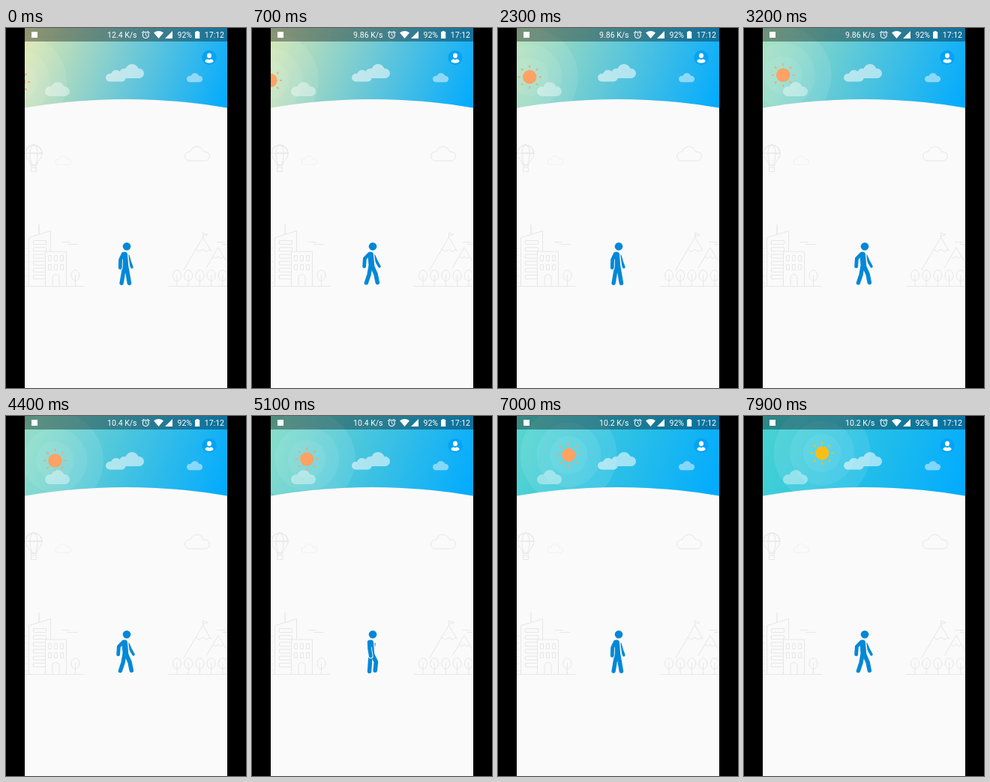
An HTML page with a canvas that plays this animation: 320x480 px, repeating every 8 s.

```html
<!DOCTYPE html>
<html>
<head>
<meta charset="utf-8">
<style>
html, body { margin: 0; width: 100%; height: 100%; overflow: hidden; background: #000; }
canvas { display: block; width: 320px; height: 480px; }
</style>
</head>
<body>
<canvas id="stage"></canvas>
<script>
const LOOP = 8000, STEP = 100, TAU = Math.PI * 2;
const LEFT = 25, WIDTH = 270, GROUND = 344.5;
const PAPER = '#fafafa', BLUE = '#0288d6', LINE = '#e7e7e7';
const canvas = document.getElementById('stage');
const ratio = window.devicePixelRatio || 1;
canvas.width = 320 * ratio;
canvas.height = 480 * ratio;
const c = canvas.getContext('2d');
c.scale(ratio, ratio);

const white = a => `rgba(255,255,255,${a})`;
const mix = (a, b, k) => a + (b - a) * k;

function oval(x, y, rx, ry) {
  c.beginPath();
  c.ellipse(x, y, rx, ry, 0, 0, TAU);
}

function disc(x, y, r, fill) {
  oval(x, y, r, r);
  c.fillStyle = fill;
  c.fill();
}

function line(color, width, ...points) {
  c.beginPath();
  for (let i = 0; i < points.length; i += 2) c.lineTo(points[i], points[i + 1]);
  c.strokeStyle = color;
  c.lineWidth = width;
  c.stroke();
}

// adds a cloud 33 x 19 units in size to the path
function puff(x, y, s) {
  for (const [cx, r] of [[6.5, 6.5], [17, 9], [26.5, 6.5]]) {
    const cy = r > 8 ? 9 : 12.5;
    c.moveTo(x + (cx + r) * s, y + cy * s);
    c.arc(x + cx * s, y + cy * s, r * s, 0, TAU);
  }
  c.rect(x + 6.5 * s, y + 10 * s, 20 * s, 9 * s);
}

function clouds(alpha, ...list) {
  c.beginPath();
  list.forEach(p => puff(...p));
  c.fillStyle = white(alpha);
  c.fill();
}

function cloudLine(x, y, s, color) {
  c.strokeStyle = color;
  c.beginPath();
  c.arc(x + 6 * s, y + 13 * s, 6 * s, Math.PI / 2, Math.PI * 1.55);
  c.arc(x + 16 * s, y + 9 * s, 9 * s, Math.PI * 1.08, Math.PI * 1.88);
  c.arc(x + 27 * s, y + 13 * s, 6 * s, Math.PI * 1.4, Math.PI * 2.5);
  c.closePath();
  c.stroke();
}

function sky(k) {
  // the near corner cools from straw to teal as the sun climbs
  const g = c.createLinearGradient(LEFT, 0, LEFT + WIDTH, 107);
  g.addColorStop(0, `rgb(${mix(226, 72, k)},${mix(232, 212, k)},${mix(172, 208, k)})`);
  g.addColorStop(1, '#00aaff');
  c.fillStyle = g;
  c.fillRect(LEFT, 0, WIDTH, 112);
}

function sun(k) {
  const x = mix(16.7, 105.3, k), y = mix(71.8, 49.2, k);
  const color = k < 0.91 ? '#ffa264' : '#f7bf16';
  disc(x, y, 64.5, white(0.09));
  disc(x, y, 43, white(0.07));
  disc(x, y, 25.5, white(0.06));
  disc(x, y, 9.2, color);
  c.lineCap = 'round';
  for (let a = 0; a < TAU; a += TAU / 8) {
    const dx = Math.cos(a), dy = Math.sin(a);
    line(color, 1.7, x + dx * 13, y + dy * 13, x + dx * 15, y + dy * 15);
  }
}

function profile() {
  const x = 271;
  disc(x, 39.5, 9.7, '#04a3f5');
  c.fillStyle = '#fff';
  oval(x, 36.8, 3, 3.4);
  c.fill();
  oval(x, 44, 5.6, 2.8);
  c.fill();
  c.fillStyle = '#04a3f5';
  c.beginPath();
  c.moveTo(x - 2, 40.8);
  c.lineTo(x + 2, 40.8);
  c.lineTo(x, 42.8);
  c.fill();
}

function tree(x) {
  c.strokeStyle = LINE;
  c.lineWidth = 1;
  oval(x, 330, 5.5, 7.2);
  c.stroke();
  line(LINE, 1, x, 329, x, GROUND);
}

function breeze(x) {
  line(LINE, 1, x, 285.5, x + 11, 285.5);
  line(LINE, 1, x + 7, 288.5, x + 21, 288.5);
}

function balloon(x, y) {
  c.strokeStyle = LINE;
  for (const r of [11, 5]) {
    c.beginPath();
    c.arc(x, y, 11, Math.PI, TAU);
    c.ellipse(x, y, r, 11, 0, Math.PI, TAU);
    c.bezierCurveTo(x + r, y + 8, x + 4, y + 10, x + r * 0.36, y + 16);
    c.lineTo(x - r * 0.36, y + 16);
    c.bezierCurveTo(x - 4, y + 10, x - r, y + 8, x - r, y);
    c.stroke();
  }
  c.strokeRect(x - 3.5, y + 19, 7, 5.5);
  for (const d of [-3, 3]) line(LINE, 1, x + d, y + 16, x + d, y + 19);
}

function city() {
  line(LINE, 1, 25, GROUND, 104, GROUND);
  line(LINE, 1, 30.5, GROUND, 30.5, 279.5, 59.5, 270.5, 59.5, GROUND);
  line(LINE, 1.5, 44, 262, 44, 275);
  for (let y = 283.5; y < 335; y += 9.2) {
    c.lineWidth = 1;
    c.strokeRect(36.5, y, 17, 5);
    line(LINE, 1, 25, y + 10, 28, y + 10);
  }
  c.fillStyle = PAPER;
  c.fillRect(52.5, 298, 28, 46);
  c.strokeRect(52.5, 298, 28, 46.5);
  for (let i = 0; i < 6; i++) c.strokeRect(56.5 + i % 3 * 8, i < 3 ? 303.5 : 315.5, 4, 7);
  c.beginPath();
  c.moveTo(62, GROUND);
  c.arc(66.5, 333, 4.5, Math.PI, TAU);
  c.lineTo(71, GROUND);
  c.stroke();
  tree(92.5);
  breeze(75);
}

function mountain(x, y, left, right, snow) {
  const slope = 1.7;
  line(LINE, 1, x - left, y + left * slope, x, y, x + right, y + right * slope);
  c.beginPath();
  for (let i = -2; i <= 2; i++)
    c.lineTo(x + i * snow / 2, y + snow * slope + (i % 2 ? 3 : 0));
  c.stroke();
}

function hills() {
  line(LINE, 1, 216, GROUND, 295, GROUND);
  mountain(262.5, 279, 26, 11, 9.5);
  mountain(283, 292.5, 16, 12, 7);
  line(LINE, 1, 262.5, 279, 262.5, 273, 269, 275.5, 262.5, 277.5);
  for (let i = 0; i < 5; i++) tree(228 + i * 15.2);
  breeze(281);
}

function scenery() {
  c.lineWidth = 1;
  c.lineCap = 'butt';
  c.lineJoin = 'round';
  balloon(37, 167);
  cloudLine(66, 170.5, 0.62, '#f1f1f1');
  cloudLine(238.5, 158, 1, LINE);
  city();
  hills();
}

// Angles from straight down, upper then lower part of each limb.
const POSES = [
  { near: [-0.44, -0.03], far: [0.28, 0.35], back: [-0.18, -0.17], front: [0.18, 0.17] },
  { near: [0.05, 0.16], far: [-0.2, -0.2], back: [-0.06, -0.07], front: [0.46, -0.1] },
  { near: [-0.76, -0.07], far: [0.4, 0.52], back: [-0.18, -0.32], front: [0.42, 0.2] }
];

function limb(x, y, [a, b], upper, lower, width, gap = 0) {
  const kx = x + Math.sin(a) * upper, ky = y + Math.cos(a) * upper;
  const ex = kx + Math.sin(b) * lower, ey = ky + Math.cos(b) * lower;
  if (gap) line(PAPER, width + gap, kx, ky, ex, ey);
  line(BLUE, width, x, y, kx, ky, ex, ey);
}

function walker(ms) {
  const pose = POSES[Math.floor((ms + 300) / 400) % 3];
  c.lineCap = c.lineJoin = 'round';
  limb(163, 304, pose.far, 7.6, 8, 3.6);
  line(PAPER, 9.6, 158.5, 302.5, 160, 315);
  limb(158, 318, pose.back, 11, 11.5, 5.4);
  limb(160.5, 318, pose.front, 11, 11.5, 5.6, 1.8);
  line(BLUE, 7.6, 158.2, 302.3, 159.4, 317);
  limb(156.2, 301.3, pose.near, 8.5, 10.5, 4.8, 1.8);
  disc(161, 291.3, 5.3, BLUE);
}

function alarm(x, y) {
  c.strokeStyle = '#fff';
  c.lineWidth = 1.1;
  oval(x, y, 4, 4);
  c.stroke();
  line('#fff', 0.9, x, y - 2.5, x, y + 0.3, x + 1.9, y + 1.5);
  for (const d of [-1, 1]) line('#fff', 1.1, x + d * 4.9, y - 3.1, x + d * 2.5, y - 5.1);
}

function statusBar(ms) {
  c.fillStyle = 'rgba(0,0,0,.36)';
  c.fillRect(LEFT, 0, WIDTH, 18);
  c.fillStyle = '#fff';
  c.fillRect(34, 5, 8, 8);

  const speeds = ['12.4', '9.86', '10.4', '10.2'];
  c.font = '10.5px Roboto, sans-serif';
  c.textAlign = 'right';
  c.fillText(speeds[Math.floor((ms + 2300) / 3000)] + ' K/s', 174.5, 13);
  c.fillText('92%', 248, 13);
  c.fillText('17:12', 291, 13);

  alarm(186.3, 9.5);

  // wifi, signal, battery
  c.beginPath();
  c.moveTo(203.5, 14);
  c.lineTo(197, 6.3);
  c.quadraticCurveTo(203.5, 1.8, 210, 6.3);
  c.fill();
  c.beginPath();
  c.moveTo(222, 4);
  c.lineTo(222, 14);
  c.lineTo(212, 14);
  c.fill();
  c.fillRect(252, 5, 6.2, 9);
  c.fillRect(253.6, 4, 3, 1.2);
}

function draw(ms) {
  const k = ms / LOOP;
  c.fillStyle = '#000';
  c.fillRect(0, 0, 320, 480);
  c.save();
  c.beginPath();
  c.rect(LEFT, 0, WIDTH, 480);
  c.clip();
  c.fillStyle = PAPER;
  c.fillRect(LEFT, 0, WIDTH, 480);
  sky(k);
  sun(k);
  clouds(0.4, [52, 72, 1]);
  clouds(0.56, [133, 56, 0.81], [151, 48, 1]);
  clouds(0.48, [241, 60, 0.64]);
  profile();
  disc(160, 893, 798, PAPER);
  scenery();
  walker(ms);
  statusBar(ms);
  c.restore();
}

const start = performance.now();
function tick() {
  const ms = (performance.now() - start) % LOOP;
  draw(Math.floor(ms / STEP) * STEP);
  requestAnimationFrame(tick);
}
tick();
</script>
</body>
</html>
```
